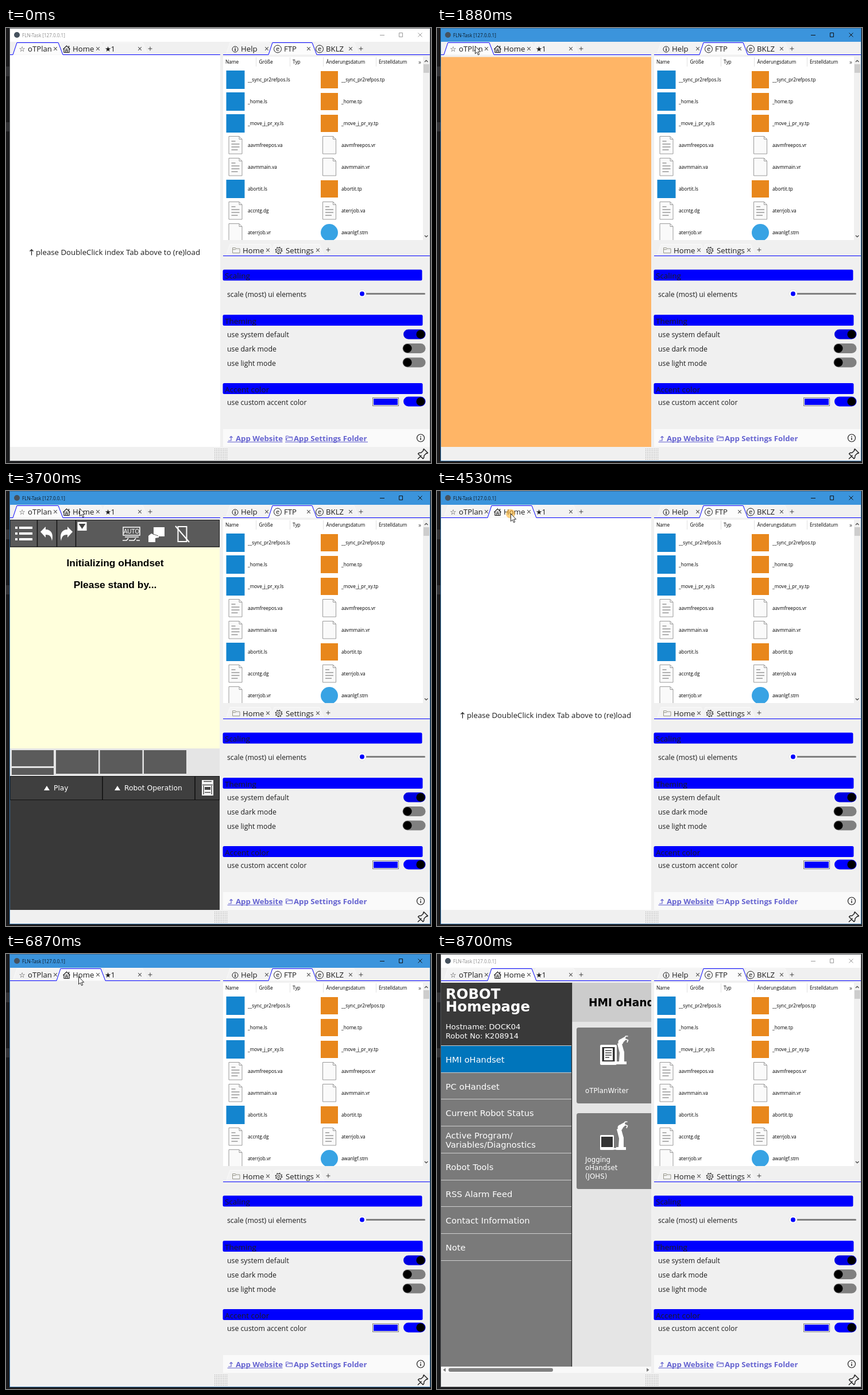
Write an HTML page that moves like this. It is 740 px wide and 757 px high and loops after 8.8 s.

```html
<!DOCTYPE html>
<html lang="en">
<head>
<meta charset="utf-8">
<title>Robot desk</title>
<style>
html, body { margin: 0; width: 100%; height: 100%; overflow: hidden; background: #1b1b1d; }
svg { display: block; width: 740px; height: 757px; }
text { font-family: "Open Sans", "Noto Sans", sans-serif; white-space: pre; }
.dv { font-family: "DejaVu Sans", sans-serif; }
.ar { font-family: "Liberation Sans", Arial, sans-serif; }
</style>
</head>
<body>
<svg id="stage" viewBox="0 0 740 757" xmlns="http://www.w3.org/2000/svg"></svg>
<script>
const LOOP = 8800;
const BLUE = '#0000fe', INK = '#1c1c1c';

const rect = (x, y, w, h, fill, more = '') =>
  `<rect x="${x}" y="${y}" width="${w}" height="${h}" fill="${fill}" ${more}/>`;
const circle = (x, y, r, fill, more = '') =>
  `<circle cx="${x}" cy="${y}" r="${r}" fill="${fill}" ${more}/>`;
const line = (d, color = INK, w = 1, more = '') =>
  `<path d="${d}" fill="none" stroke="${color}" stroke-width="${w}" ${more}/>`;
const fill = (d, color) => `<path d="${d}" fill="${color}"/>`;
const text = (x, y, s, size, color = INK, more = '') =>
  `<text x="${x}" y="${y}" font-size="${size}" fill="${color}" ${more}>${s}</text>`;
const group = (id, body, more = '') => `<g id="${id}" ${more}>${body}</g>`;
const cross = (x, y, r = 2.8, color = '#555', w = 1.1) =>
  line(`M${x - r} ${y - r}l${2 * r} ${2 * r}m0 ${-2 * r}l${-2 * r} ${2 * r}`, color, w);
const plus = (x, y) => line(`M${x - 3.5} ${y}h7m-3.5 -3.5v7`, '#444');

// ---- window frame
function titleBar(id, bg, border, ink, name) {
  return group(id,
    rect(7, 1, 731, 23, bg) +
    rect(6.5, 0.5, 732, 753, 'none', `stroke="${border}"`) +
    circle(19, 12, 5, '#46525e') +
    text(28, 15.5, 'FLN-Task [127.0.0.1]', 8.1, name) +
    line('M651 12.5h8M684.5 8.5h6v7h-6z', ink) + cross(721, 12, 3.5, ink, 1));
}

function frame() {
  let s = rect(0, 0, 740, 757, '#1b1b1d');
  s += rect(0, 67, 6, 17, '#333336') + rect(0, 164, 6, 16, '#333336');
  s += rect(7, 1, 731, 752, '#f0f0f0');
  s += titleBar('idle', '#ffffff', '#55585c', '#999', '#8a8a8a');
  s += titleBar('live', '#3b94dc', '#2f6ea5', '#111', '#0c1a26');
  for (let y = 732; y < 752; y += 3)
    for (let x = 363; x < 385; x += 3) s += rect(x, y, 1.2, 1.2, '#aaa');
  s += line('M717 750l6.500 -6.500M727.500 732.500l7 7l-1.500 1l-1 -.5l-4 4l-.5 4l-1.500 1.500l-8.500 -8.500l1.500 -1.500l4 -.5l4 -4l-.5 -1z',
    INK, 1.4, 'stroke-linejoin="round"');
  return s;
}

// ---- tabs
const tabShape = (a, b, y, h) => `M${a} ${y + h}L${a + 7} ${y}H${b - 8}L${b} ${y + h}`;
const idleTab = (a, b, y = 25.5, h = 21) =>
  `<path d="${tabShape(a, b, y, h)}" fill="#f3f3f3" stroke="#fafafa"/>`;
const activeTab = (a, b, from, to) =>
  `<path d="${tabShape(a, b, 25.5, 21)}" fill="#fcfcfc"/>` +
  line(`M${from} 46.5H${a}L${a + 7} 25.5H${b - 8}L${b} 46.5H${to}`, BLUE);
const label = (x, s, y = 41) => text(x, y, s, 13.2);
const roundIcon = (x, y, c) =>
  circle(x, y, 6.5, 'none', `stroke="${INK}"`) + text(x, y + 3.6, c, 11, INK, 'text-anchor="middle"');

function tabs() {
  let s = idleTab(12, 99) + idleTab(88, 173) + idleTab(165, 246);
  s += group('tabA', activeTab(12, 99, 7, 373)) + group('tabB', activeTab(88, 173, 7, 373));
  s += text(22.5, 40.5, '☆', 12.5, INK, 'class="dv"') + label(38, 'oTPlan') + cross(86, 36);
  s += line('M99.500 37l6 -6l6 6M101 36v6.500h9v-6.500M104 42v-3.500h3v3.500M103.500 36.500h4M109.500 34v-3', INK, 1.2);
  s += label(116, 'Home') + cross(160, 36);
  s += text(172, 40.5, '★', 12.5, INK, 'class="dv"') + label(182.5, '1') + cross(233, 36) + plus(251, 36);

  s += idleTab(383, 466) + idleTab(532, 614) + activeTab(457, 541, 378, 738);
  s += circle(399, 37, 5, 'none', `stroke="${INK}"`) + line('M399 34v1.300M399 36.300v3.700', INK, 1.6);
  s += label(409, 'Help') + cross(454, 36);
  s += roundIcon(473, 36.5, 'e') + label(484, 'FTP') + cross(527, 36);
  s += roundIcon(546, 36.5, 'e') + label(557, 'BKLZ') + cross(600, 36) + plus(618, 36);

  s += idleTab(383, 468, 376.5, 20) + idleTab(460, 554, 376.5, 20) + line('M378 396.500H738', BLUE);
  s += line('M394.500 391.500v-9h5l1 1.500h6.500v7.500zM394.500 385.500h5l1 -1.500', '#97978a');
  s += label(412, 'Home', 392) + cross(456, 386.5);
  s += circle(475, 387, 4.7, 'none', `stroke="${INK}" stroke-width=".9"`) +
    circle(475, 387, 2, 'none', `stroke="${INK}" stroke-width=".9"`);
  s += circle(475, 387, 5.8, 'none', `stroke="${INK}" stroke-width="1.200" stroke-dasharray="2 2.550"`);
  s += label(487, 'Settings', 392) + cross(543, 386.5) + plus(561, 386);
  return s;
}

// ---- file list
const FILES = [
  ['__sync_pr2refpos.ls', '__sync_pr2refpos.tp'], ['_home.ls', '_home.tp'],
  ['_move_j_pr_xy.ls', '_move_j_pr_xy.tp'], ['aavmfreepos.va', 'aavmfreepos.vr'],
  ['aavmmain.va', 'aavmmain.vr'], ['abortit.ls', 'abortit.tp'],
  ['accntg.dg', 'aterrjob.va'], ['aterrjob.vr', 'awanlgf.stm']];

function fileIcon(ext, x, y) {
  if (ext === 'ls') return rect(x - 16, y - 16, 32, 32, '#1485cf');
  if (ext === 'tp') return rect(x - 15, y - 15, 30, 30, '#e8871c');
  if (ext === 'stm') return circle(x, y, 15, '#38a3e4');
  const page = `<path d="M${x - 11.5} ${y - 15.5}h18l5 5v25.500h-23z" fill="#fafafa" stroke="#9a9a9a"/>` +
    line(`M${x + 6.5} ${y - 15.5}v5h5`, '#9a9a9a');
  if (ext === 'vr') return page;
  return page + line(`M${x - 7} ${y - 7}h7m-7 5h14m-14 5h14m-14 5h11`, '#b0b0b0', 2);
}

function files() {
  let s = rect(378, 50, 348, 319, '#fff') + rect(726, 50, 12, 319, '#f0f0f0');
  [[382, 'Name'], [440.5, 'Größe'], [499, 'Typ'], [557.5, 'Änderungsdatum'], [649, 'Erstelldatum']]
    .forEach(([x, name]) => { s += text(x, 62, name, 8.3, '#000'); });
  s += line('M435.500 51v16M494.500 51v16M552.500 51v16M644.500 51v16', '#e2e2e2');
  s += text(718, 63, '»', 10, '#444');
  s += rect(727, 63, 10, 15, '#cdcdcd');
  s += line('M729 59l2.700 -2.700l2.700 2.700M729 361l2.700 2.700l2.700 -2.700', '#444', 1.3);
  let rows = '';
  FILES.forEach((row, i) => row.forEach((name, k) => {
    const y = 90 + 38 * i;
    rows += fileIcon(name.split('.')[1], k ? 563 : 399.5, y);
    rows += text(k ? 584 : 421, y + 3, name, 8.2, '#000');
  }));
  return s + `<g clip-path="url(#list)">${rows}</g>`;
}

// ---- settings
const heading = (y, s, w = 347) =>
  rect(377.5, y, w, 19, BLUE, 'rx="2.500"') + text(381, y + 15.5, s, 13.5, INK);
const toggle = (y, on, color = BLUE) => on
  ? rect(692, y - 8.5, 38.5, 17, color, 'rx="8.500"') + circle(722, y, 7.6, '#000')
  : rect(690.5, y - 8.5, 40, 17, '#808080', 'rx="8.500"') + circle(699, y, 7.6, '#000');

function settings() {
  const row = (y, s) => text(385, y, s, 12.3);
  const link = '#6563d0';
  return heading(420.5, 'Scaling') + heading(499, 'Theming', 348) + heading(618, 'Accent color', 348) +
    row(468, 'scale (most) ui elements') + row(538, 'use system default') +
    row(563, 'use dark mode') + row(588, 'use light mode') + row(655.5, 'use custom accent color') +
    rect(620, 461, 110, 3, '#808080', 'rx="1.500"') +
    circle(620, 462.5, 7, '#fff', 'stroke="#d8d8d8" stroke-width=".6"') + circle(620, 462.5, 4, BLUE) +
    toggle(533, true, '#0000e2') + toggle(557.5) + toggle(582) + toggle(650, true) +
    rect(638.5, 643.5, 45, 14, '#fff', 'stroke="#777"') + rect(640, 645, 42, 11, BLUE) +
    rect(378, 698, 360, 31, '#fafafa') +
    line('M387 718h5v-7.500M389.500 713l2.500 -2.500l2.500 2.500', link, 1.2) +
    text(400, 718.5, 'App Website', 13.2, link, 'font-weight="700"') +
    line('M385.500 720.500H481.500', link) +
    line('M487.500 718v-8h4l1 1.500h6v6.500zM487.500 718l2 -5h9.500', link) +
    text(501, 718.5, 'App Settings Folder', 13.2, link, 'font-weight="700"') +
    group('under', line('M486 720.500H630', link)) +
    circle(722, 713.5, 6.5, 'none', `stroke="${INK}" stroke-width="1.200"`) +
    line('M722 710v1.500M722 712.800v4.200', INK, 1.4);
}

// ---- left pane views
const blank = () => rect(7, 47, 366, 682, '#fff') +
  line('M44.500 395.500v-10M41.500 388.500l3 -3l3 3', INK, 1.2) +
  text(52, 395, 'please DoubleClick index Tab above to (re)load', 13.24);

function pendant() {
  const W = '#fff', mid = 'text-anchor="middle"';
  let s = rect(7, 50, 365, 48, '#5a5a5a') + rect(7.5, 50.5, 364, 46.5, 'none', 'stroke="#1c1c1c"');
  s += line('M54.500 51v46M88.500 51v46M121.500 51v46', '#111', 1.5);
  for (const y of [64, 74, 84]) s += rect(16, y - 2, 4, 4, W) + rect(23, y - 2, 23, 4, W);
  const undo = 'M60 71l9 -9v5c10 0 14 8 11 20c-1 -8 -4 -11 -11 -11v5z';
  s += fill(undo, W) + `<g transform="translate(176 0) scale(-1 1)">${fill(undo, W)}</g>`;
  s += rect(124.5, 54, 16, 15, W) + fill('M126.500 57h12l-6 9z', '#444');
  s += rect(204, 63, 29, 14, 'none', `stroke="${W}" stroke-width="1.500"`);
  s += text(218.5, 74, 'AUTO', 10, W, `class="ar" ${mid}`);
  s += line('M207 80h24M203 86h7l3 -4M214 86h9l3 -4M227 86h6', W, 1.6);
  s += rect(257, 63, 19, 16, W) + fill('M248 89v-11l5 -4l5 2l8 2v3l-6 1v7z', W) +
    line('M256 75l9 3', '#5a5a5a', 1);
  s += rect(299.5, 62, 15, 26, 'none', `stroke="${W}" stroke-width="2"`) + line('M295 61l24 28', W, 2);
  s += rect(7, 98, 365, 350, '#ffffdc');
  s += text(190, 131, 'Initializing oHandset', 17.4, '#000', `class="ar" font-weight="700" ${mid}`);
  s += text(190, 169, 'Please stand by...', 17.4, '#000', `class="ar" font-weight="700" ${mid}`);
  s += rect(7, 448, 365, 48, '#e5e5e5');
  [[10, 451, 73, 28], [10, 482, 73, 12], [87, 451, 74, 41], [163.500, 451, 74, 41], [240, 451, 74, 41]]
    .forEach(k => { s += rect(...k, '#5b5b5b'); });
  s += rect(7, 496, 365, 233, '#393939') + rect(7.5, 496.5, 364, 41, '#3f3f3f', 'stroke="#111"');
  s += line('M168 497v40M329 497v40', '#111', 1.6);
  s += fill('M66 521l5 -8l5 8zM189 521l5 -8l5 8z', W);
  s += text(83, 521, 'Play', 12.3, W, 'class="dv"') + text(206, 521, 'Robot Operation', 12.3, W, 'class="dv"');
  s += rect(341, 503, 20, 27, W) + line('M342 511.500h18M344 505.500h14', '#444', 1.4) +
    rect(346, 515, 10, 5, '#444') + line('M344 513v15M358 513v15M346 524.500h10', '#444', 1.4);
  return s;
}

const arm = (x, y) =>
  fill(`M${x - 8} ${y + 50}v-5h4l1 -15l-4 -16l7 -3l5 18v16h4v5z`, '#fff') +
  circle(x - 1, y + 11, 4.5, '#fff') + circle(x + 1, y + 30, 4, '#fff') +
  fill(`M${x - 3} ${y + 7}l9 -5l2 5l-8 8z`, '#fff') +
  line(`M${x + 6} ${y + 4.5}l1.500 -3.500h4M${x + 7} ${y + 6}l4.500 2l-1.500 4`, '#fff', 1.7);

function home() {
  const dv = 'class="dv"', bold = 'class="dv" font-weight="700"', W = '#fff';
  let s = rect(7, 50, 366, 679, '#e5e5e5') + rect(235, 50, 138, 68, '#cccccc');
  s += text(264, 91, 'HMI oHandset', 18.6, '#000', bold);
  s += rect(243, 128, 150, 132, '#7a7a7a', 'rx="3.500"') + rect(243, 277, 150, 132, '#7a7a7a', 'rx="3.500"');
  s += rect(284, 158, 29, 35, W, 'rx="2"') + rect(287.5, 162, 22, 25, '#333') +
    rect(291, 164, 15, 21, W) + line('M293 168h11m-11 4h11m-11 4h11m-11 4h7', '#444', 1.5);
  s += arm(321, 142) + line('M313 190.500h4', W, 3);
  s += rect(284, 315, 24, 26, W, 'rx="1.500"') + rect(286, 318, 20, 18, '#333') +
    arm(320, 291) + line('M307 339h6', W, 3);
  s += text(258, 242, 'oTPlanWriter', 11.8, W, dv);
  ['Jogging', 'oHandset', '(JOHS)'].forEach((t, i) => { s += text(258, 362 + 14.4 * i, t, 11.8, W, dv); });

  s += rect(7, 50, 227, 669, '#7a7a7a') + rect(7, 50, 227, 109, '#393939') + rect(7, 159, 227, 47, '#0075bb');
  s += line('M234.500 50V718', '#2c2c2c', 1.4);
  s += text(15, 78, 'ROBOT', 24.4, W, bold) + text(15, 99.5, 'Homepage', 24.4, W, bold);
  s += text(15, 131, 'Hostname: DOCK04', 13.1, W, dv) + text(15, 147, 'Robot No: K208914', 13.1, W, dv);
  const items = ['HMI oHandset', 'PC oHandset', 'Current Robot Status',
    'Active Program/|Variables/Diagnostics', 'Robot Tools', 'RSS Alarm Feed', 'Contact Information', 'Note'];
  items.forEach((item, i) => {
    const y = 189 + 46.7 * i, parts = item.split('|');
    parts.forEach((t, k) => {
      s += text(15, y + (parts.length > 1 ? 16 * k - 8 : 0), t, 14.67, W, dv);
    });
    s += line(`M7 ${Math.round(159 + 46.7 * i) + 0.5}h227`, '#cfcfcf');
  });
  s += line('M7 533.500h227', '#cfcfcf');
  s += rect(7, 718, 366, 11, '#f9f9f9') + rect(20, 720.5, 182, 6.5, '#808080', 'rx="3.200"');
  s += fill('M15 720.500v6.500l-4.500 -3.250zM365 720.500v6.500l4.500 -3.250z', '#777');
  return s;
}

const VIEWS = {
  blank: blank(),
  orange: rect(7, 50.5, 366, 678.5, '#ffb566'),
  empty: '',
  pendant: pendant(),
  home: home()
};

const $ = id => document.getElementById(id);
$('stage').innerHTML =
  '<defs><clipPath id="list"><rect x="378" y="68" width="348" height="301"/></clipPath>' +
  '<clipPath id="pane"><rect x="7" y="47" width="366" height="682"/></clipPath></defs>' +
  frame() + files() + settings() +
  `<g clip-path="url(#pane)">${Object.keys(VIEWS).map(k => group(k, VIEWS[k])).join('')}</g>` +
  tabs() +
  circle(0, 0, 8, '#ffb02e', 'id="press"') +
  group('cursor', '<path d="M.5 .5V13.800L3.500 11L5.600 15.800L7.700 14.900L5.600 10.200H9.700Z" fill="#fff" stroke="#111" stroke-width=".9"/>');

// ---- timeline
const PANE = [[0, 'blank'], [1880, 'orange'], [2810, 'empty'], [2980, 'pendant'],
  [4400, 'blank'], [5860, 'orange'], [6870, 'empty'], [6930, 'home']];
const PRESSES = [[1510, 1600], [1700, 1880], [4330, 4620], [5560, 5640], [5720, 5860]];
// start, end, from, to, bend of the horizontal part
const MOVES = [
  [320, 1180, [657, 757], [66, 33], 1],
  [1280, 1281, [66, 33], [66, 31], 1],
  [2980, 3700, [66, 31], [128, 30], 1],
  [3900, 4190, [128, 30], [128, 39], 1],
  [5300, 5301, [128, 39], [126, 39], 1],
  [7600, 8310, [126, 39], [714, 758], 1.5]];

const ease = u => u * u * (3 - 2 * u);
const show = (id, on) => { $(id).style.display = on ? '' : 'none'; };

function pointer(t) {
  const [a, b, from, to, bend] = MOVES.filter(m => m[0] <= t).pop() || MOVES[0];
  const u = ease(Math.min(1, Math.max(0, (t - a) / (b - a))));
  return [from[0] + (to[0] - from[0]) * u ** bend, from[1] + (to[1] - from[1]) * u];
}

function draw(t) {
  const view = PANE.filter(p => p[0] <= t).pop()[1];
  for (const k in VIEWS) show(k, k === view);
  const live = t >= 1510 && t < 8700;
  show('live', live);
  show('idle', !live);
  const first = t < 4400;
  show('tabA', first);
  show('tabB', !first);
  show('under', t < 400);

  const [x, y] = pointer(t);
  show('cursor', t >= 320 && t < 8310);
  $('cursor').setAttribute('transform', `translate(${x.toFixed(1)} ${y.toFixed(1)})`);
  const press = PRESSES.find(p => t >= p[0] && t < p[1]);
  show('press', !!press);
  if (press) {
    $('press').setAttribute('cx', x);
    $('press').setAttribute('cy', y + 0.5);
    $('press').setAttribute('opacity', 0.6);
  }
}

const start = performance.now();
function tick() {
  draw((performance.now() - start) % LOOP);
  requestAnimationFrame(tick);
}
tick();
</script>
</body>
</html>
```
